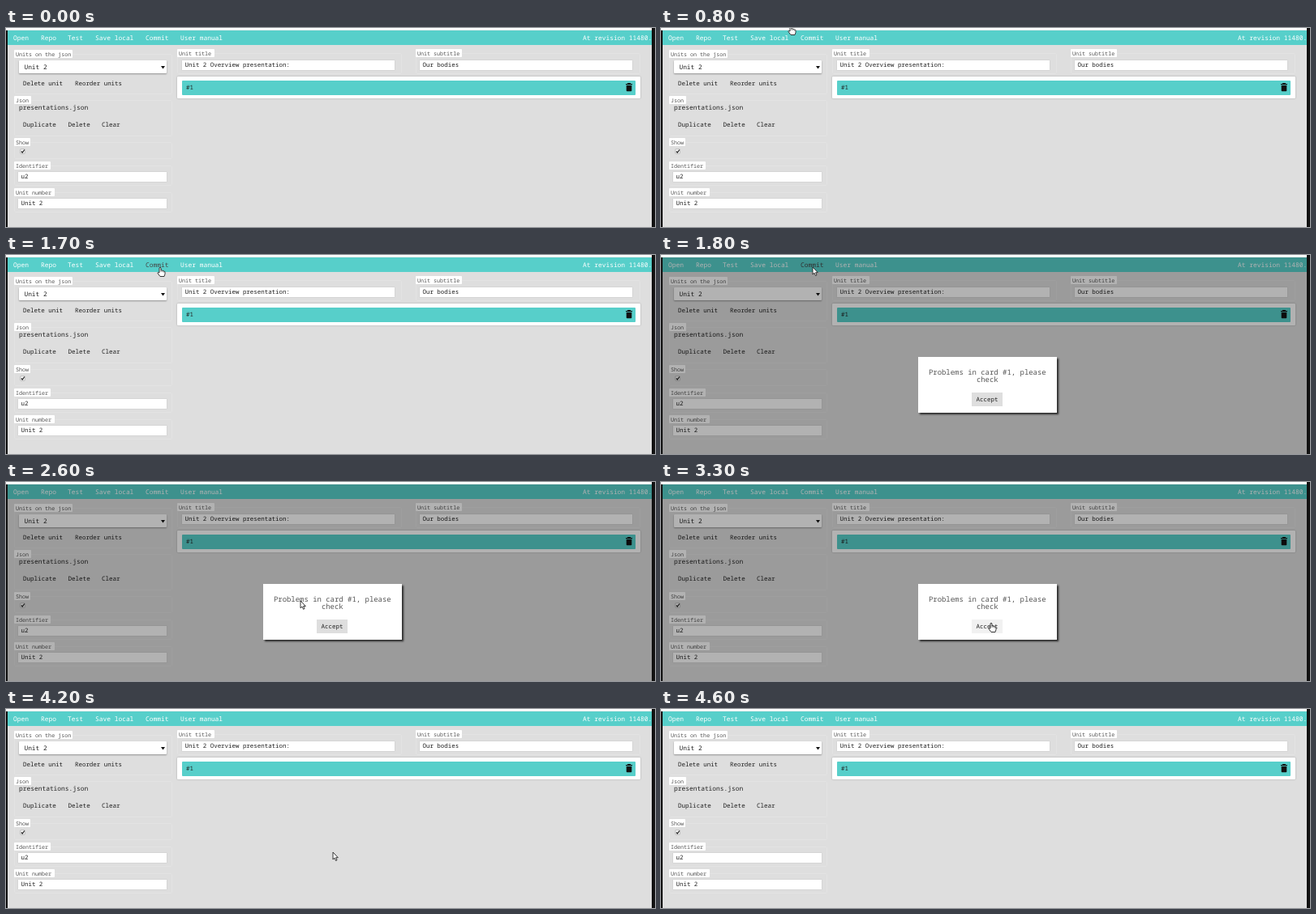
Animation, 800 px wide and 246 px high, one loop 5800 ms. Source, as an HTML page with a canvas:

```html
<!DOCTYPE html>
<html lang="en">
<head>
<meta charset="utf-8">
<title>Unit editor</title>
<style>
  html, body { margin: 0; width: 100%; height: 100%; overflow: hidden; background: #dedede; }
  canvas { display: block; }
</style>
</head>
<body>
<canvas id="stage" width="800" height="246"></canvas>
<script>
const ctx = document.getElementById('stage').getContext('2d');
const LOOP = 5800, STEP = 100;
const TEAL = '#57cfca', INK = '#222', PAGE = '#dedede';
const DIALOG_OPEN = 1800, DIALOG_CLOSE = 4200;
const MENU = [['Open', 9], ['Repo', 43], ['Test', 76], ['Save local', 110],
  ['Commit', 172], ['User manual', 215], ['At revision 11480.', 711]];

// time, x, y of the pointer tip
const PATH = [[700, 158, -7], [800, 160, -3], [1200, 186, 17], [1700, 190, 15],
  [1800, 187, 15], [2400, 335, 130], [2900, 405, 172], [3000, 406, 173],
  [3300, 407, 174], [3700, 403, 177], [4200, 403, 177], [4300, 400, 176], [4600, 400, 176]];

function box(x, y, w, h, color, radius = 0) {
  ctx.fillStyle = color;
  ctx.beginPath();
  ctx.roundRect(x, y, w, h, radius);
  ctx.fill();
}

function outline(x, y, w, h, color, radius = 0) {
  ctx.strokeStyle = color;
  ctx.lineWidth = 1;
  ctx.beginPath();
  ctx.roundRect(x + 0.5, y + 0.5, w - 1, h - 1, radius);
  ctx.stroke();
}

function text(str, x, y, size = 7.45, color = INK, align = 'left') {
  ctx.font = `${size}px "Noto Sans Mono", "Liberation Mono", monospace`;
  ctx.textRendering = 'geometricPrecision';
  ctx.textAlign = align;
  ctx.fillStyle = color;
  ctx.fillText(str, x, y);
}

function shape(points, fill) {
  ctx.beginPath();
  points.forEach(([x, y]) => ctx.lineTo(x, y));
  ctx.closePath();
  ctx.fillStyle = fill;
  ctx.fill();
}

function withShadow(color, blur, dx, dy, draw) {
  ctx.save();
  ctx.shadowColor = color;
  ctx.shadowBlur = blur;
  ctx.shadowOffsetX = dx;
  ctx.shadowOffsetY = dy;
  draw();
  ctx.restore();
}

function fieldset(label, x, y, w, h, labelWidth) {
  outline(x, y, w, h, '#e3e3e3', 1);
  box(x, y - 5, labelWidth, 10, '#fff', 1);
  text(label, x + 2, y + 2.5, 6.7, '#555');
}

function input(value, x, y, w, h) {
  outline(x - 1, y - 1, w + 2, h + 2, '#d5d5d5', 1);
  box(x, y, w, h, '#fff');
  text(value, x + 3.5, y + h / 2 + 2.3);
}

function trash() {
  box(764, 69, 8, 1.2, '#111');
  box(766, 68, 4, 1.2, '#111');
  box(764.7, 71, 6.6, 7.2, '#111', [0, 0, 1, 1]);
}

function drawPage(commitHover) {
  box(0, 0, 800, 246, PAGE);
  box(2, 3, 794, 18, TEAL);
  for (const [name, x] of MENU)
    text(name, x, 14.5, 7.9, name === 'Commit' && commitHover ? '#444' : '#fff');

  fieldset('Units on the json', 10, 32, 195, 50, 72);
  withShadow('rgba(0,0,0,.35)', 2, 0, 1, () => box(16, 40, 182, 16, '#fff', 1));
  text('Unit 2', 22.5, 51, 7.8);
  shape([[191, 47], [196, 47], [193.5, 50.5]], '#111');
  text('Delete unit', 21, 70.7);
  text('Reorder units', 85, 70.7);

  fieldset('Json', 10, 89, 195, 45, 21);
  text('presentations.json', 16, 100.5, 7.9);
  text('Duplicate', 21, 122.3, 7.55);
  text('Delete', 76.5, 122.3, 7.55);
  text('Clear', 118, 122.3, 7.55);

  fieldset('Show', 10, 141, 195, 21, 20);
  box(17.5, 149.5, 6, 6, '#aaa', 1);
  box(18, 150, 5, 5, '#eee', 1);
  ctx.strokeStyle = INK;
  ctx.lineWidth = 1.2;
  ctx.beginPath();
  ctx.moveTo(18.8, 152.5);
  ctx.lineTo(20.2, 154);
  ctx.lineTo(22.8, 150.5);
  ctx.stroke();

  fieldset('Identifier', 10, 170, 195, 25, 45);
  input('u2', 15, 178, 183, 12);
  fieldset('Unit number', 10, 203, 195, 25, 50);
  input('Unit 2', 15, 211, 183, 12);

  fieldset('Unit title', 211, 31, 277, 26, 46);
  input('Unit 2 Overview presentation:', 217, 40, 262, 12);
  fieldset('Unit subtitle', 505, 31, 277, 26, 57);
  input('Our bodies', 510, 40, 262, 12);

  withShadow('rgba(0,0,0,.3)', 2, 0, 0, () => box(211, 60, 571, 27, '#fff', 1));
  box(217, 65, 559, 18, TEAL, 1);
  text('#1', 222, 76.3);
  trash();
}

function drawDialog(hover, focus) {
  box(2, 3, 794, 243, 'rgba(0,0,0,.3)');
  withShadow('rgba(0,0,0,.75)', 2, 1.5, 1.5, () => box(317, 126, 171, 69, '#fff'));
  text('Problems in card #1, please', 402.3, 148.3, 8.95, '#555', 'center');
  text('check', 402.3, 157.3, 8.95, '#555', 'center');
  box(383, 170, 38, 17, hover ? '#f1f1f1' : PAGE);
  if (focus) outline(383, 170, 38, 18, '#9db9e6');
  text('Accept', 402, 180.8, 7.45, INK, 'center');
}

function drawFrame() {
  box(0, 3, 2, 243, '#111');
  box(796, 0, 4, 246, '#111');
  box(0, 0, 796, 2.5, '#fff');
}

function pointerAt(t) {
  const i = PATH.findIndex(p => p[0] > t);
  if (i < 1) return null;
  const [t0, x0, y0] = PATH[i - 1], [t1, x1, y1] = PATH[i];
  const k = (t - t0) / (t1 - t0);
  return [x0 + (x1 - x0) * k, y0 + (y1 - y0) * k];
}

function drawPointer([x, y], hand) {
  const path = new Path2D(hand
    ? 'M-1 1Q0 -.6 1 1V4Q2.3 3.2 2.9 4.5Q4.2 3.9 4.6 5.2Q6 4.8 6 6.2V8.5L5 11.5H0L-3 7.6Q-3.4 5.8-1 7Z'
    : 'M0 0V9L2 7.2L3.5 10.5L5 9.8L3.6 6.7H6.3Z');
  ctx.save();
  ctx.translate(x, y);
  ctx.fillStyle = '#fff';
  ctx.strokeStyle = '#222';
  ctx.lineWidth = 0.9;
  ctx.lineJoin = 'round';
  ctx.fill(path);
  ctx.stroke(path);
  if (hand) {
    ctx.lineWidth = 0.5;
    ctx.stroke(new Path2D('M1 4V6M2.9 4.6V6.3M4.6 5.3V6.6'));
  }
  ctx.restore();
}

function render(now) {
  const t = Math.floor(now % LOOP / STEP) * STEP;
  const pointer = pointerAt(t);
  const overButton = t >= 2800 && t < DIALOG_CLOSE;
  drawPage(t >= 1200 && t < 1900);
  if (t >= DIALOG_OPEN && t < DIALOG_CLOSE) drawDialog(overButton, t >= 4000);
  drawFrame();
  if (pointer) drawPointer(pointer, t < DIALOG_OPEN || overButton);
}

const start = performance.now();
function tick() {
  render(performance.now() - start);
  requestAnimationFrame(tick);
}
tick();
</script>
</body>
</html>
```
